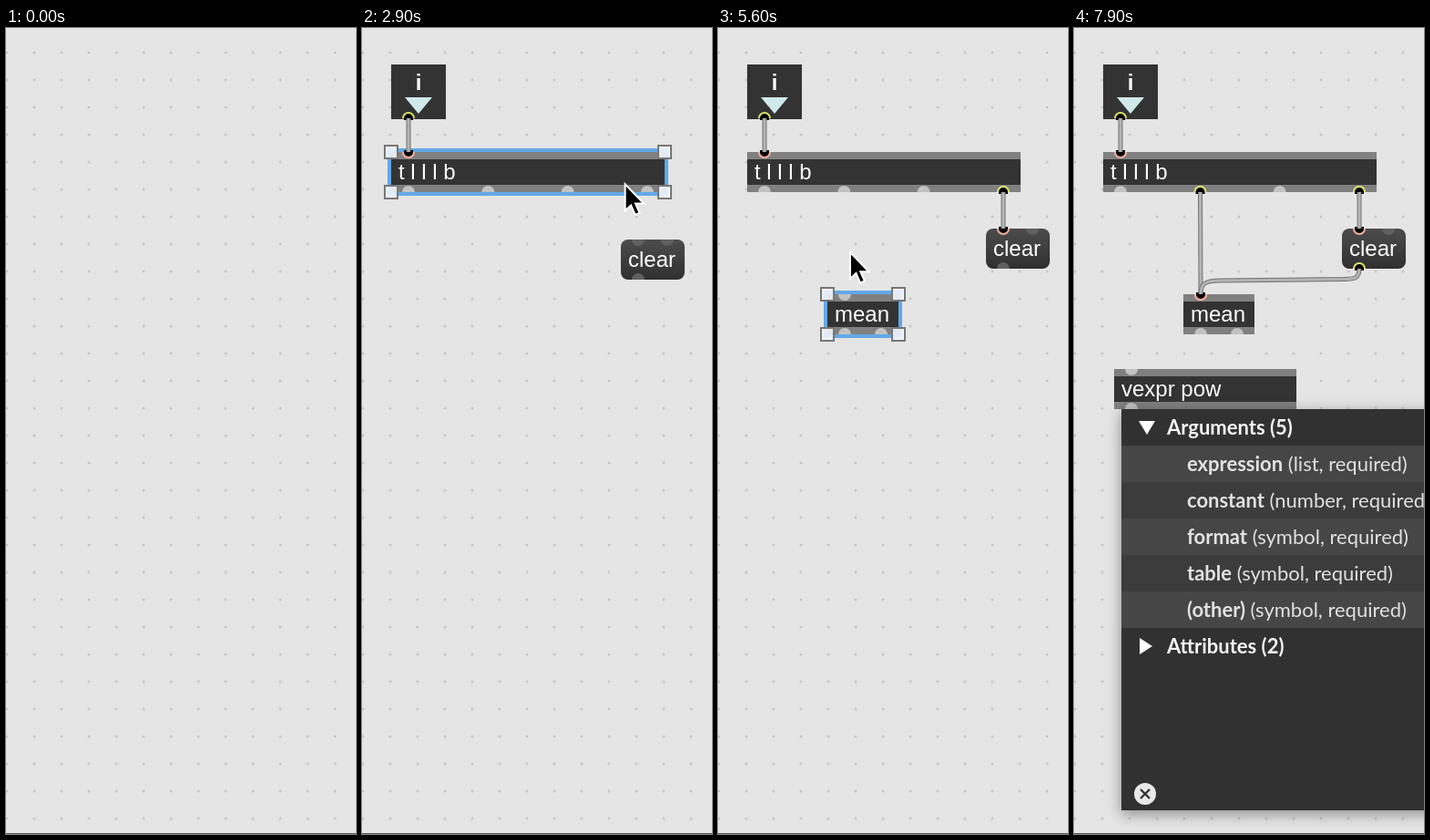
Write an HTML page that moves like this. It is 384 by 884 pixels and loops after 8000 ms.

```html
<!DOCTYPE html>
<html lang="en">
<head>
<meta charset="utf-8">
<title>Patching</title>
<style>
  html, body { margin: 0; width: 100%; height: 100%; overflow: hidden; background: #e5e5e5; }
  svg { display: block; }
  text { white-space: pre; font: 24px "Liberation Sans", Arial, sans-serif; fill: #fff; }
  .menu text { font: 22px Lato, sans-serif; fill: #e2e2e2; }
  .menu .b { font-weight: 700; }
  .menu .head { font-weight: 700; fill: #f6f6f6; }
  .shadow { filter: drop-shadow(0 4px 8px rgba(0, 0, 0, .4)); }
</style>
</head>
<body>
<svg width="384" height="884" viewBox="0 0 384 884">
  <defs>
    <pattern id="dots" x="-14" y="12" width="30" height="30" patternUnits="userSpaceOnUse">
      <circle cx="15" cy="15" r="1.5" fill="#c6c6c6"/>
    </pattern>
    <linearGradient id="msg" x2="0" y2="1">
      <stop stop-color="#4c4c4c"/><stop offset="1" stop-color="#303030"/>
    </linearGradient>
  </defs>
  <rect width="384" height="884" fill="#e5e5e5"/>
  <rect width="384" height="884" fill="url(#dots)"/>
  <rect y="883" width="384" height="1" fill="#555"/>
  <g id="scene"></g>
</svg>
<script>
const scene = document.getElementById('scene');
const pen = document.createElement('canvas').getContext('2d');
pen.font = '24px "Liberation Sans", Arial, sans-serif';

const objects = {
  t: ['t|Send input to many places in order', 'text|Format messages as a text file', 'timer|Report elapsed time',
    'tab|Tab control', 'tan|Tangent function', 'tanh|Hyperbolic tangent function', 'tempo|Output numbers at a tempo',
    'textbutton|Button with text', 'textedit|Enter text', 'thresh|Combine numbers into a list'],
  i: ['i|Store an integer value', 'if|Conditional statement', 'in|Message input', 'incdec|Increment a value',
    'inlet|Receive messages', 'int|Store an integer value', 'iter|Break up a list', 'itable|Edit a table of data',
    'imovie|Play a movie', 'info~|Report on a buffer'],
  m: ['match|Look for a series', 'makenote|Generate note pairs', 'maximum|Output the greatest', 'mean|Calculate a running average',
    'message|Send any message', 'metro|Output a bang at intervals', 'midiin|Output raw data', 'minimum|Output the smallest',
    'mtof|Convert note to frequency', 'jit.3m|Report min/mean/max values'],
  v: ['v|Store a value', 'value|Share a stored message', 'vdp|Control a player', 'vexpr|Evaluate a math expression',
    'vectral~|Vector-based envelope', 'vs~|Smooth a signal', 'vu|Level display', 'vpreset|Store settings',
    'vlist|Work with lists', 'vzl|List processing']
};
const vexprArgs = ['expression|(list, required)', 'constant|(number, required)', 'format|(symbol, required)',
  'table|(symbol, required)', '(other)|(symbol, required)'];
const triggerArgs = ['output-formats|(symbol, optional)'];

const rect = (x, y, w, h, fill, more = '') => `<rect x="${x}" y="${y}" width="${w}" height="${h}" fill="${fill}" ${more}/>`;
const path = (d, fill, more = '') => `<path d="${d}" fill="${fill}" ${more}/>`;
const label = (x, y, s, more = '') => `<text x="${x}" y="${y}" ${more}>${s}</text>`;
const circle = (x, y, r, fill, more = '') => `<circle cx="${x}" cy="${y}" r="${r}" fill="${fill}" ${more}/>`;
const half = (x, y, r, sweep) => `M${x - r} ${y}A${r} ${r} 0 0 ${sweep} ${x + r} ${y}`;
const mix = (a, b, k) => a + (b - a) * Math.min(1, Math.max(0, k));

// Ports: sweep 0 hangs below the top edge, sweep 1 rises from the bottom edge.
const port = (x, y, sweep, fill) => path(half(x, y, 7, sweep), fill);
const ports = (x, y, w, n, sweep, fill = '#c2c2c2') => Array.from({length: n}, (_, i) =>
  port(x + 19 + (n > 1 ? i * (w - 38) / (n - 1) : 0), y, sweep, fill)).join('');

function box(x, y, w, s, ins, outs) {
  return rect(x, y, w, 44, '#808080') + rect(x, y + 8, w, 28, '#333') +
    ports(x, y, w, ins, 0) + ports(x, y + 44, w, outs, 1) + label(x + 8, y + 30, s);
}

function message(x, y, s, w = 70) {
  return rect(x, y, w, 44, 'url(#msg)', 'rx="8"') + ports(x, y, w, 2, 0, '#606060') +
    ports(x, y + 44, w, 1, 1, '#606060') + label(x + 8, y + 30, s);
}

function inlet() {
  return rect(32, 40, 60, 60, '#333') + label(62, 68, 'i', 'text-anchor="middle" font-weight="700" style="font-weight:700"') +
    path('M47 76H77L62 94Z', '#d0e9ea') + port(51, 100, 1, '#5c5c5c');
}

function selection(x, y, w, h) {
  let s = rect(x - 2, y - 2, w + 4, h + 4, 'none', 'stroke="#62a8e8" stroke-width="4"');
  for (const cx of [x, x + w]) for (const cy of [y, y + h])
    s += rect(cx - 7, cy - 7, 14, 14, '#f4f7fa', 'fill-opacity=".88" stroke="#777" stroke-width="2"');
  return s;
}

function cord(x1, y1, x2, y2, {d, selected, loose} = {}) {
  const mid = (y1 + y2) / 2;
  d = d || `M${x1} ${y1}C${x1} ${mid} ${x2} ${mid} ${x2} ${y2}`;
  const line = (color, w) => path(d, 'none', `stroke="${color}" stroke-width="${w}"`);
  const cap = (x, y, sweep, color) => rect(x - 5, sweep ? y : y - 2, 10, 2, '#000') +
    path(half(x, y, 6, sweep), '#000', `stroke="${color}" stroke-width="2"`);
  return cap(x1, y1, 1, '#dbe268') + (loose ? '' : cap(x2, y2, 0, '#f3ab9b')) +
    (selected ? line('#8496d9', 10) + line('#5468b4', 5) + line('#8f9dd6', 3) : line('#737373', 5) + line('#b4b4b4', 3)) +
    (selected ? circle(145, 281, 6, 'none', 'stroke="#8c1039" stroke-width="2"') +
      circle(306, 275, 6, 'none', 'stroke="#176b35" stroke-width="2"') : '');
}

function caret(x, y, s) {
  return rect(x + 8 + pen.measureText(s).width, y + 9, 2, 26, '#fff');
}

function menu(x, y, s) {
  const row = (i, fill) => rect(x, y + 40 * i, 420, 40, fill);
  const entry = (i, text, sep) => {
    const [name, rest] = text.split('|');
    return label(x + 72, y + 40 * i + 28, `<tspan class="b">${name}</tspan>${sep}${rest}`);
  };
  let out = rect(x, y, 420, 440, '#313131', 'class="shadow"');
  if (s.includes(' ')) {
    const args = s[0] === 'v' ? vexprArgs : triggerArgs, n = args.length, ay = y + 40 * n + 60;
    out += path(`M${x + 19} ${y + 13}h18l-9 15z`, '#fff') + label(x + 50, y + 28, `Arguments (${n})`, 'class="head"');
    args.forEach((a, i) => out += row(i + 1, i % 2 ? '#3c3c3c' : '#464646') + entry(i + 1, a, ' '));
    out += path(`M${x + 20} ${ay - 9}v18l14-9z`, '#fff') + label(x + 50, ay + 8, 'Attributes (2)', 'class="head"');
  } else {
    const list = objects[s[0]].filter(o => o.startsWith(s) || s.length === 1 || s[0] === 'm' && o.startsWith('jit'));
    list.forEach((o, i) => {
      const hit = s.length > 1 && o.startsWith(s + '|'), ry = y + 40 * i;
      out += row(i, hit ? '#56ade6' : i % 2 ? '#464646' : '#3b3b3b') +
        rect(x + 32, ry + 8, 28, 28, '#a5b79c') +
        circle(x + 46, ry + 22, 5.2, 'none', 'stroke="#f1f4ef" stroke-width="3.4"') + entry(i, o, ' - ');
    });
  }
  const cx = x + 26, cy = y + 422;
  out += circle(cx, cy, 12, '#e8e8e8') +
    path(`M${cx - 5} ${cy - 5}l10 10m0 -10l-10 10`, 'none', 'stroke="#333" stroke-width="2.4"');
  return `<g class="menu">${out}</g>`;
}

// A box being typed into, with its completion list.
function editor(x, y, s, showCaret = true) {
  return box(x, y, 200, s, 1, 1) + (s ? menu(x + 8, y + 44, s) : '') + (showCaret ? caret(x, y, s) : '');
}

function arrow(x, y) {
  return path(`M${x} ${y}v29l6.5 -6 4.6 10.6 4.8 -2.1 -4.6 -10.3h9.2z`, '#000', 'stroke="#fff" stroke-width="2"');
}

function resizer(x, y) {
  return path(`M${x - 14} ${y}l9 -8v6h10v-6l9 8 -9 8v-6h-10v6z`, '#000', 'stroke="#fff" stroke-width="2"');
}

// Pointer stops: step, x, y
const stops = [[14, 90, 178], [17, 62, 160], [18, 134, 180], [21, 332, 180], [22, 51, 98], [23, 51, 138],
  [26, 240, 200], [27, 240, 158], [30, 313, 178], [32, 303, 232], [33, 321, 243], [40, 321, 243], [42, 331, 231],
  [44, 142, 285], [53, 142, 285], [54, 170, 326], [55, 152, 314], [57, 138, 178], [59, 139, 290], [60, 313, 262],
  [62, 139, 290], [63, 239, 369], [65, 239, 369], [68, 44, 366], [70, 44, 366]];

function pointer(n) {
  const i = stops.findIndex(p => p[0] >= n);
  const b = stops[i], a = stops[Math.max(0, i - 1)], k = b[0] === a[0] ? 1 : (n - a[0]) / (b[0] - a[0]);
  return [mix(a[1], b[1], k), mix(a[2], b[2], k)];
}

function draw(n) {
  let boxes = '', cords = '', top = '';
  const within = (a, b) => n >= a && n <= b;

  if (within(2, 8)) top += editor(32, 40, 'inlet'.slice(0, Math.min(5, n - 2)));
  if (n >= 9) boxes += inlet();
  if (n === 9) top += selection(32, 40, 60, 60);

  if (within(10, 13)) top += editor(60, 154, ['t', 't l', 't l l', 't l l l b'][n - 10]);
  if (n >= 14) {
    const k = (n - 14) / 3, x = mix(60, 32, k), y = mix(154, 136, k), w = mix(102, 300, (n - 19) / 2);
    boxes += box(x, y, w, 't l l l b', 1, 4);
    if (n <= 22 || within(27, 39)) boxes += selection(x, y, w, 44);
  }
  if (n >= 23) cords += cord(51, 99, 51, 136);

  const k = (n - 40) / 2, cx = mix(284, 294, k), cy = mix(232, 220, k);
  if (within(24, 26)) {
    const s = ['c', 'cle', 'clear'][n - 24];
    boxes += message(284, 232, s) + caret(284, 232, s);
  }
  if (n >= 27) boxes += message(cx, cy, 'clear');
  if (within(40, 42)) boxes += selection(cx, cy, 70, 44);
  if (n >= 33) cords += cord(313, 180, cx + 19, cy);

  if (within(45, 52)) top += editor(138, 304, 'mean'.slice(0, n - 45));
  if (n >= 53) {
    const m = n - 54, x = mix(138, 120, m), y = mix(304, 292, m);
    boxes += box(x, y, 78, 'mean', 1, 2);
    if (n <= 56) boxes += selection(x, y, 78, 44);
  }
  if (n >= 59) cords += cord(138.5, 180, 139, 292);
  if (n >= 62) cords += cord(313, 264, 139, 292, {
    d: 'M313 264C313 276 306 275 296 275.5L160 277C143 277 139 281 139 292', selected: n <= 65
  });

  if (n >= 69) top += editor(44, 374, 'vexpr pow'.slice(0, Math.max(0, n - 70)), n < 79);

  if (within(14, 23) || within(26, 70)) {
    const [px, py] = pointer(n);
    if (within(31, 32)) cords += cord(313, 180, px, py, {loose: true});
    if (n === 58) cords += cord(138.5, 180, px, py, {loose: true});
    if (n === 61) cords += cord(313, 264, px, py, {loose: true});
    top += within(18, 21) ? resizer(px, py) : arrow(px, py);
  }
  scene.innerHTML = boxes + cords + top;
}

let shown = -1;
const start = performance.now();
function tick() {
  const n = Math.floor((performance.now() - start) % 8000 / 100);
  if (n !== shown) draw(shown = n);
  requestAnimationFrame(tick);
}
tick();
</script>
</body>
</html>
```
